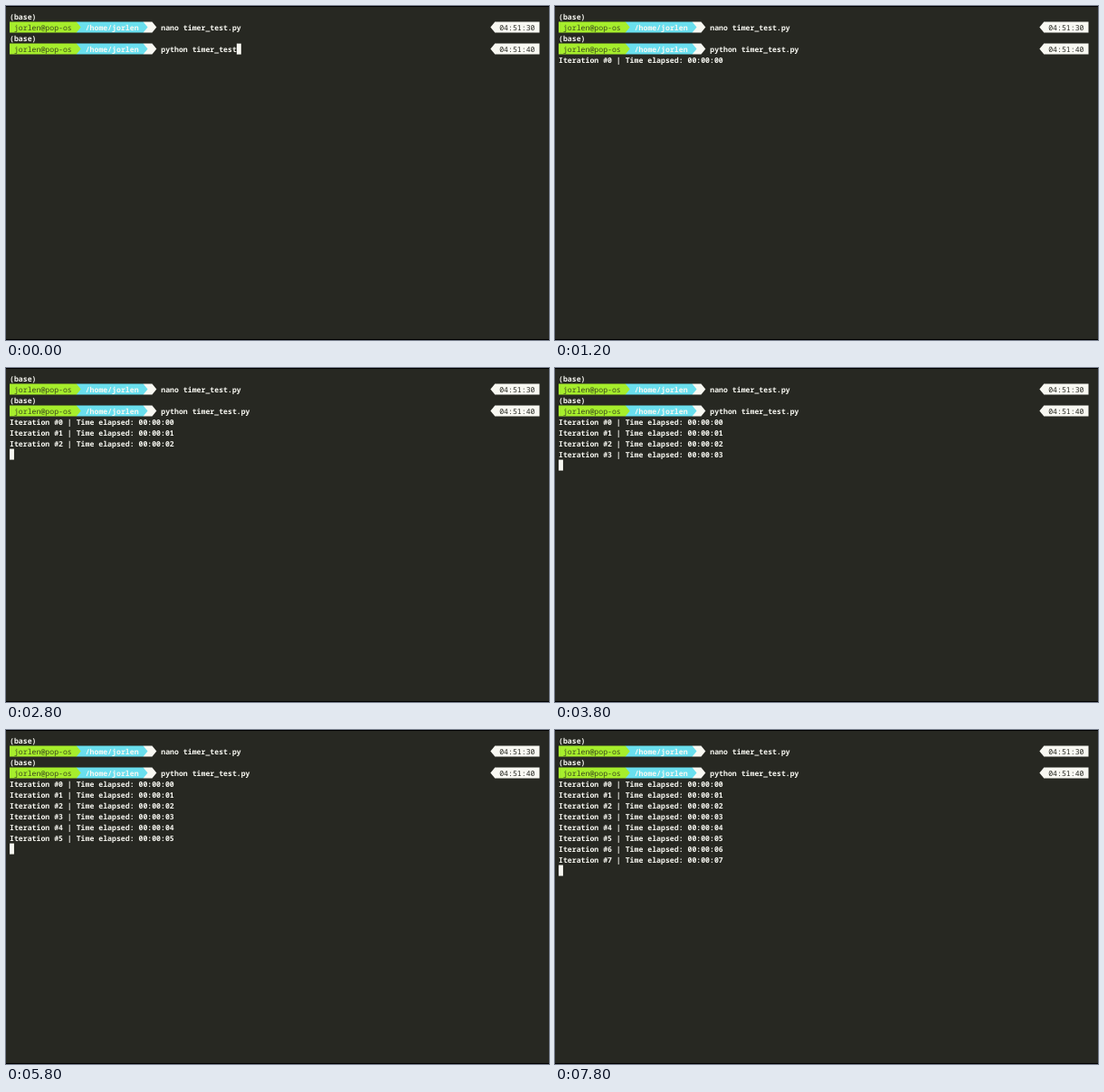
Animation, 600 px wide and 370 px high, one loop 8000 ms. Source, as an HTML page with a canvas:

```html
<!DOCTYPE html>
<html lang="en">
<head>
<meta charset="utf-8">
<title>Timer test</title>
<style>
  html, body { margin: 0; width: 100%; height: 100%; overflow: hidden; background: #272822; }
  canvas { display: block; }
</style>
</head>
<body>
<canvas id="term" width="600" height="370"></canvas>
<script>
const ctx = document.getElementById('term').getContext('2d');
const LOOP = 8000;
const COL = 4.92, ROW = 12, LEFT = 4, TOP = 5.6;
const BG = '#272822', FG = '#f8f8f2', GREEN = '#a6ee2c', CYAN = '#6adfee';
const USER = 'jorlen';

const x = col => LEFT + col * COL;
const y = row => TOP + row * ROW;

function text(str, col, row, color = FG, weight = 600) {
  ctx.font = `${weight} 8.2px "Noto Sans Mono", "DejaVu Sans Mono", monospace`;
  ctx.textRendering = 'geometricPrecision';
  ctx.fillStyle = color;
  ctx.fillText(str, x(col), y(row) + 8.9);
}

// Bar from one column to another, with a point at the tip column.
function segment(flat, shoulder, tip, row, color) {
  ctx.fillStyle = color;
  ctx.beginPath();
  ctx.moveTo(x(flat), y(row));
  ctx.lineTo(x(shoulder), y(row));
  ctx.lineTo(x(tip), y(row) + ROW / 2);
  ctx.lineTo(x(shoulder), y(row) + ROW);
  ctx.lineTo(x(flat), y(row) + ROW);
  ctx.fill();
}

function prompt(row, command, clock) {
  text('(base)', 0, row - 1);
  segment(30, 32, 33, row, FG);
  segment(15, 30, 31, row, CYAN);
  segment(0, 15, 16, row, GREEN);
  text(USER + '@pop-os', 1, row, '#3c471f', 400);
  text('/home/' + USER, 17, row);
  text(command, 34, row);
  segment(119, 109, 108, row, FG);
  text(clock, 110, row, BG, 500);
}

function cursor(col, row) {
  ctx.fillStyle = FG;
  ctx.fillRect(x(col), y(row), COL, ROW);
}

function draw(t) {
  ctx.fillStyle = BG;
  ctx.fillRect(0, 0, 600, 370);
  ctx.fillStyle = '#000';
  ctx.fillRect(0, 0, 600, 1);
  ctx.fillRect(0, 369, 600, 1);

  const typed = 'python timer_test.py'.slice(0, 17 + Math.floor(t / 200));
  prompt(1, 'nano timer_test.py', '04:51:30');
  prompt(3, typed, '04:51:40');

  if (t < 800) {
    cursor(34 + typed.length, 3);
    return;
  }
  const lines = Math.floor((t - 800) / 1000) + 1;
  for (let i = 0; i < lines; i++) {
    text(`Iteration #${i} | Time elapsed: 00:00:0${i}`, 0, 4 + i);
  }
  // The cursor shows briefly after each new line.
  if ((t - 800) % 1000 < 400) cursor(0, 4 + lines);
}

const start = performance.now();
function frame() {
  draw((performance.now() - start) % LOOP);
  requestAnimationFrame(frame);
}
frame();
</script>
</body>
</html>
```
